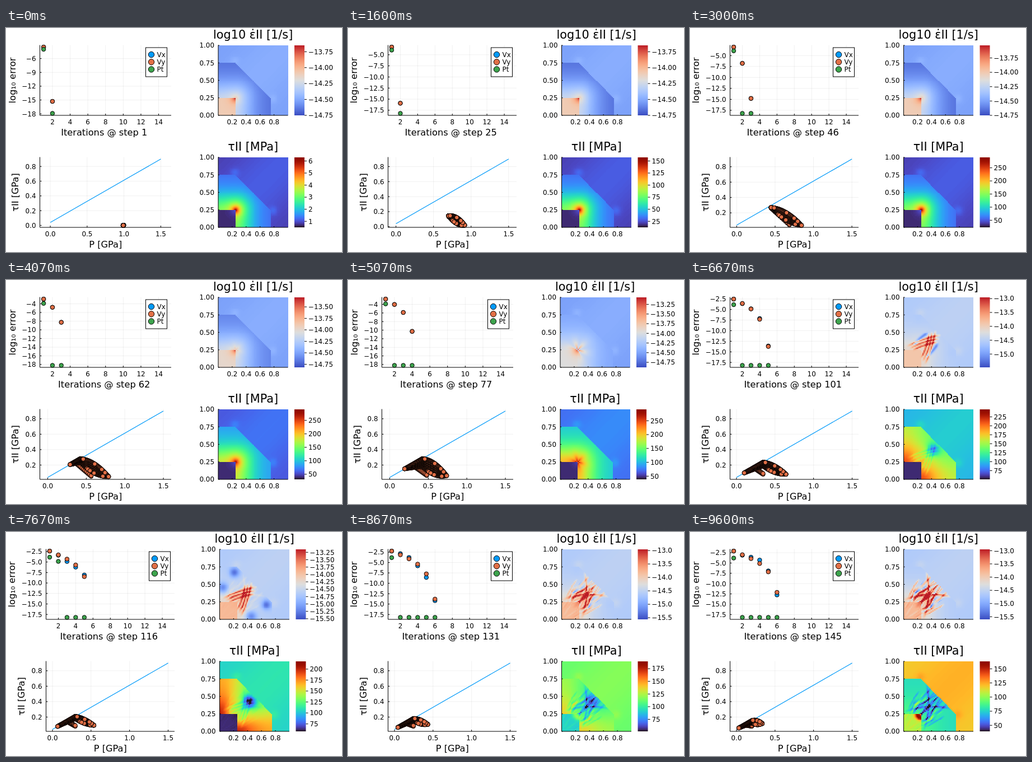
Write an HTML page with a canvas that moves like this. It is 600 px wide and 400 px high and loops after 9.67 s.

```html
<!DOCTYPE html>
<html lang="en">
<head>
<meta charset="utf-8">
<title>Shear band simulation</title>
<style>
html, body { margin: 0; width: 100%; height: 100%; overflow: hidden; background: #fff; }
svg, canvas { position: absolute; left: 0; top: 0; }
canvas { width: 124.5px; height: 125px; image-rendering: pixelated; }
text { font-family: "DejaVu Sans", sans-serif; font-size: 11.9px; fill: #000; }
.label { font-size: 16.2px; }
.title { font-size: 20.8px; }
.axis { stroke: #000; stroke-width: 1; fill: none; }
.grid { stroke: #000; stroke-opacity: .08; stroke-width: .8; }
</style>
</head>
<body>
<canvas id="strain" width="64" height="64"></canvas>
<canvas id="stress" width="64" height="64"></canvas>
<svg width="600" height="400" viewBox="0 0 600 400"><defs id="defs"></defs><g id="plot"></g></svg>
<script>
const LOOP = 9670, STEPS = 145, N = 64, TOP = 30.5, H = 125.5;
const BLUE = '#009af9', ORANGE = '#e26f46', GREEN = '#3da44d';
const $ = id => document.getElementById(id);
const mix = (a, b, f) => a + (b - a) * f;
const clamp = v => Math.max(0, Math.min(1, v));
const ramp = (s, a, b) => clamp((s - a) / (b - a));
const pulse = (s, mid, w) => Math.exp(-(((s - mid) / w) ** 2));

let seed = 11;
const rnd = () => (seed = seed * 16807 % 2147483647) / 2147483647;

// Colour maps
const GREY = [221, 221, 221];
const blend = (a, b, lift, u) => a.map((c, i) => mix(c, b[i], u) + lift[i] * Math.sin(Math.PI * u));
const warm = v => v < .5
  ? blend([59, 76, 192], GREY, [0, 28, 48], 2 * v)
  : blend(GREY, [188, 28, 38], [42, 36, -6], 2 * v - 1);
const CURVES = [
  [.1357, 4.6154, -42.6603, 132.1311, -152.9424, 59.2864],
  [.0914, 2.1942, 4.8430, -14.1850, 4.2773, 2.8296],
  [.1067, 12.6419, -60.5820, 110.3628, -89.9031, 27.3482]];
const turbo = v => CURVES.map(p => 255 * clamp(p.reduceRight((s, c) => s * v + c, 0)));
const shades = map => Array.from({ length: 256 }, (_, i) => map(i / 255).map(Math.round));

// Curved streak with soft ends
function streak(x, y, [x0, y0, x1, y1, bend, w]) {
  const dx = x1 - x0, dy = y1 - y0, len = Math.hypot(dx, dy);
  const u = ((x - x0) * dx + (y - y0) * dy) / (len * len);
  if (u < 0 || u > 1) return 0;
  const v = ((y - y0) * dx - (x - x0) * dy) / len - bend * 4 * u * (1 - u);
  return pulse(v, 0, w) * Math.min(1, 5 * u, 5 * (1 - u));
}

const arcs = [0, 1, 2].map(i => [.24 + .03 * i, .12 - .04 * i, .36 + .05 * i, .5 + .02 * i, -.02, .014]);
const sweep = [.28, 0, .32, .7, -.05, .015];
const rays = Array.from({ length: 18 }, () => {
  const x = rnd() * .38, y = .02 + rnd() * .3, t = .75 + rnd() * .4, l = .25 + rnd() * .25;
  return [x, y, x + l * Math.cos(t), y + l * Math.sin(t), .03 * (rnd() - .5), .008 + rnd() * .008];
});

// Everything about a cell that does not depend on time
const cells = Array.from({ length: N * N }, (_, i) => {
  const x = (i % N + .5) / N, y = 1 - (Math.floor(i / N) + .5) / N;
  const both = b => streak(x, y, b) + streak(y, x, b);
  const spot = (a, b, w) => pulse(x, a, w) * pulse(y, b, w) + pulse(x, b, w) * pulse(y, a, w);
  const turn = Math.atan2(y - .25, x - .25) - Math.PI / 4;
  return {
    core: x < .25 && y < .25,
    ring: x < .75 && y < .75 && x + y < 1,
    far: Math.hypot(Math.max(0, x - .25), Math.max(0, y - .25)),
    r: Math.hypot(x - .25, y - .25),
    star: Math.cos(6 * turn),
    cross: Math.cos(4 * (Math.atan2(y, x) - Math.PI / 4)),
    tilt: .02 * Math.cos(3 * (x - y)),
    halo: .04 * spot(.78, .24, .06),
    early: arcs.reduce((s, b) => s + both(b), 0),
    flank: both([.13, .29, .36, .5, .02, .022]),
    late: both(sweep) + rays.reduce((s, b, i) => s + both(b) * (i % 3 ? .7 : -.6), 0),
    cold: spot(.21, .67, .07) + spot(.04, .45, .08),
    pit: spot(.4, .46, .08),
    wedge: spot(.235, .2, .045)
  };
});

// Strength of the first and the late shear bands
const early = s => ramp(s, 80, 101) * (1 - .7 * ramp(s, 118, 135));
const late = s => ramp(s, 112, 140);
const jolt = s => pulse(s, 116, 8);

const strain = {
  id: 'strain', y: 31, map: shades(warm), steps: [.25, .5],
  range: s => [
    -14.75 - .13 * ramp(s, 46, 77) - .6 * ramp(s, 77, 101) - .12 * ramp(s, 101, 145),
    mix(-13.65, -12.95, ramp(s, 38, 85)) - .2 * jolt(s)],
  field(s) {
    const out = mix(.22, .38, ramp(s, 77, 101)), ring = mix(.07, .36, ramp(s, 55, 101));
    const near = mix(.35, .18, ramp(s, 55, 101)), tip = .45 * (1 - ramp(s, 80, 101));
    const core = .6 - .1 * pulse(s, 75, 18) + .08 * ramp(s, 85, 116), lobe = .3 * pulse(s, 82, 14);
    const e = .4 * early(s), l = .4 * late(s), flank = .3 * pulse(s, 101, 10), cold = .3 * jolt(s);
    return c => {
      const bands = e * c.early + l * c.late - flank * c.flank;
      if (c.core) return core + tip * Math.exp(-c.r / .05) + .3 * bands;
      if (!c.ring) return out + c.halo + c.tilt;
      return ring + near * Math.exp(-((c.far / .25) ** 1.5)) + .4 * tip * Math.exp(-c.r / .07)
        + lobe * c.star * Math.exp(-c.r / .06) + bands - cold * c.cold;
    };
  }
};

const stress = {
  id: 'stress', y: 231, map: shades(turbo), steps: [1, 2, 5, 10, 25, 50],
  range: s => [Math.min(.5 * s, 64 - .85 * (s - 116)), Math.min(6.3 * s, 291, 291 - 1.88 * (s - 77))],
  field(s) {
    const [lo, hi] = this.range(s);
    const out = (Math.min(s, 101) + .45 * Math.max(0, s - 101) - lo) / (hi - lo);
    const ring = .12 + .14 * ramp(s, 46, 77) + .27 * ramp(s, 77, 110) - .22 * ramp(s, 116, 145);
    const near = .34 + .05 * pulse(s, 77, 15) - .25 * ramp(s, 90, 140);
    const core = .03 + .51 * ramp(s, 116, 145), tip = .55 * (1 - ramp(s, 50, 101));
    const cross = .15 * ramp(s, 85, 116) * (1 - ramp(s, 120, 145)), lobe = .1 * pulse(s, 85, 14);
    const pit = .25 * pulse(s, 116, 20), wedge = .4 * ramp(s, 120, 145);
    const e = .1 * early(s), l = .2 * late(s);
    return c => {
      const bands = e * c.early + l * c.late;
      if (c.core) return core + .15 * tip * Math.exp(-c.r / .05) + wedge * c.wedge - .3 * bands;
      if (!c.ring) return out + c.halo + c.tilt;
      return ring + near * Math.exp(-((c.far / .25) ** 1.6)) + tip * Math.exp(-c.r / .06)
        + lobe * c.star * Math.exp(-c.r / .08) - cross * c.cross - pit * c.pit - bands;
    };
  }
};

for (const m of [strain, stress]) {
  m.ctx = $(m.id).getContext('2d');
  m.img = m.ctx.createImageData(N, N);
  const stops = Array.from({ length: 33 }, (_, i) =>
    `<stop offset="${i / 32}" stop-color="rgb(${m.map[Math.round(i / 32 * 255)]})"/>`).join('');
  $('defs').innerHTML += `<linearGradient id="g-${m.id}" x1="0" y1="1" x2="0" y2="0">${stops}</linearGradient>`;
}

// Newton convergence: slow start, then a geometric plunge after `delay` iterations
const first = s => -3.5 + .0097 * (s - 1);
const DELAY = [[1, -.91], [25, -.97], [46, .16], [77, 1.72], [101, 2.36], [116, 3.21], [145, 3.6]];
function delay(s) {
  const i = Math.min(DELAY.length - 1, DELAY.findIndex(p => p[0] > s) + DELAY.length) % DELAY.length || 0;
  const k = s >= STEPS ? DELAY.length - 1 : DELAY.findIndex(p => p[0] > s);
  const [a, b] = [DELAY[k - 1], DELAY[k]];
  return mix(a[1], b[1], ramp(s, a[0], b[0]));
}
const residual = (s, j) => first(s) - (j ? .85 * j + 3.5 ** (j - delay(s)) : 0);

// Grains of the stress cloud: flank along the yield line, tail, hook
const GRAINS = [];
const fill = (kind, cols, rows) => {
  for (let i = 0; i < cols; i++)
    for (let j = rows - 1; j >= 0; j--) GRAINS.push([kind, (i / (cols - 1)) ** 1.2, j / (rows - 1)]);
};
fill('hook', 12, 2);
fill('tail', 55, 6);
fill('flank', 42, 6);
for (let i = 0; i < 10; i++) GRAINS.push(['tail', rnd(), i % 2]);

const onYield = p => .04 + .573 * p;
function cloudPoints(s) {
  const pl = s < 48 ? 1 - .012 * s : .424 * Math.exp((48 - s) / 37);
  const left = [pl, Math.min(.006 * (s - 1), onYield(pl))];
  const pp = Math.max(pl, .424 - .0033 * Math.max(0, s - 77));
  const peak = [pp, Math.min(.006 * (s - 1), onYield(pp))];
  const end = [1 - .0034 * s - .0036 * Math.max(0, s - 97), .0008 * s];
  const hook = [mix(pp, end[0], .6 * (1 - ramp(s, 46, 90))), Math.min(.09, .0007 * s + .02 * ramp(s, 1, 20))];
  const bow = .05 * ramp(s, 1, 30) * (1 - .6 * ramp(s, 77, 116));
  const thick = .1 * ramp(s, 48, 77) * (1 - .7 * ramp(s, 77, 110));
  const at = (a, b, u, drop) => [mix(a[0], b[0], u), mix(a[1], b[1], u) - drop];
  return GRAINS.map(([kind, u, v]) =>
    kind === 'flank' ? at(peak, left, u, v * thick * (1 - u))
    : kind === 'tail' ? at(peak, end, u, v * thick * (1 - u) + (2 * v - 1) * bow * 4 * u * (1 - u))
    : at(at(left, peak, .6, .5 * thick), hook, u, .01 * v * ramp(s, 1, 20)));
}

// SVG helpers
const line = (x1, y1, x2, y2, cls = 'axis') => `<path class="${cls}" d="M${x1} ${y1}L${x2} ${y2}"/>`;
const text = (x, y, s, anchor = 'middle', cls = '') =>
  `<text class="${cls}" x="${x}" y="${y}" text-anchor="${anchor}">${s}</text>`;
const side = (x, y, s) =>
  `<text class="label" text-anchor="middle" transform="translate(${x} ${y}) rotate(-90)">${s}</text>`;
const dot = (x, y, fill, r = 3.7) =>
  `<circle cx="${x.toFixed(2)}" cy="${y.toFixed(2)}" r="${r}" fill="${fill}" stroke="#000"/>`;
const num = (v, d) => (Math.abs(v) < 1e-9 ? 0 : v).toFixed(d).replace('-', '−');

function ticks(lo, hi, step) {
  const out = [];
  for (let i = Math.ceil(lo / step - 1e-6); i * step <= hi + 1e-6; i++) out.push(i * step);
  return out;
}

function frame(left, right, top, xs, ys, px, py, dx, dy) {
  const bottom = top + H;
  let s = '';
  for (const v of xs) s += line(px(v), top, px(v), bottom, 'grid') + line(px(v), bottom, px(v), bottom - 3)
    + text(px(v), bottom + 15.5, num(v, dx));
  for (const v of ys) s += line(left, py(v), right, py(v), 'grid') + line(left, py(v), left + 3, py(v))
    + text(left - 7, py(v) + 4.4, num(v, dy), 'end');
  return s + `<path class="axis" d="M${left} ${top}V${bottom}H${right}"/>`;
}

function errors(step, left, right, grid) {
  const floor = mix(-17.9, -18.2, ramp(step, 1, 20)), hi = first(step), pad = .03 * (hi - floor);
  const px = v => left + (v - .58) / 14.84 * (right - left);
  const py = v => TOP + (hi + pad - v) / (hi - floor + 2 * pad) * H;
  let vx = '', vy = '', pt = '';
  for (let j = 0; j < 6; j++) {
    const x = px(j + 1), e = residual(step, j);
    const shift = .85 * ramp(step, 98, 112) * ramp(j, 0, 3) * Math.sin(1.1 * (j - 1.4) + .134 * (STEPS - step));
    const p = j === 0 ? -3.98 + .0012 * step : j === 1 && jolt(step) > .9 ? -4.85 : floor;
    vx += dot(x, py(e + shift), BLUE);
    vy += dot(x, py(e), ORANGE);
    pt += dot(x, py(p), GREEN);
    if (e < -8) break;
  }
  let s = frame(left, right, TOP, ticks(2, 14, 2), ticks(floor - pad, hi + pad, grid), px, py, 0, grid === 2.5 ? 1 : 0)
    + vx + vy + pt + `<rect x="${right - 45.5}" y="35" width="38" height="52" fill="#fff" stroke="#000"/>`;
  [['Vx', BLUE], ['Vy', ORANGE], ['Pt', GREEN]].forEach(([name, c], i) => {
    s += dot(right - 35.5, 47.5 + 13.2 * i, c, 5.2) + text(right - 25.5, 51.8 + 13.2 * i, name, 'start');
  });
  return s + side(grid === 2.5 ? 15.5 : 16.5, 93.5, 'log₁₀ error')
    + text((left + right) / 2 - 2.5, 192, 'Iterations @ step ' + step, 'middle', 'label');
}

function cloud(step, left, right) {
  const pts = cloudPoints(step);
  const low = Math.min(.04, ...pts.map(p => p[1]));
  const scale = H / ((.9 - low) * 1.06), pad = .03 * (.9 - low), mid = (left + right) / 2;
  const px = v => mid + (v - .75) * scale, py = v => TOP + 200 + (.9 + pad - v) * scale;
  return frame(left, right, TOP + 200, [0, .5, 1, 1.5], ticks(low - pad, .9, .2), px, py, 1, 1)
    + `<path d="M${px(0)} ${py(.04)}L${px(1.5)} ${py(.9)}" stroke="${BLUE}" stroke-width="1.2"/>`
    + pts.map(p => dot(px(p[0]), py(p[1]), ORANGE)).join('')
    + side(left - 38.5, 293.5, 'τII [GPa]') + text(mid, 392, 'P [GPa]', 'middle', 'label');
}

function heat(m, step, left, title) {
  const value = m.field(step), data = m.img.data;
  cells.forEach((c, i) => data.set([...m.map[Math.round(255 * clamp(value(c)))], 255], 4 * i));
  m.ctx.putImageData(m.img, 0, 0);
  $(m.id).style.left = left + 'px';
  $(m.id).style.top = m.y + 'px';

  const y = m.y, bottom = y + 125, bar = left + 136;
  let s = `<path class="axis" d="M${left} ${y - .5}V${bottom}H${left + 124.5}"/>`;
  for (const v of [.2, .4, .6, .8]) {
    const x = left + 124.5 * v;
    s += line(x, bottom, x, bottom - 2) + text(x, bottom + 15.5, v.toFixed(1));
  }
  for (const v of [0, .25, .5, .75, 1]) {
    const h = bottom - 125 * v;
    s += line(left, h, left + 2, h) + text(left - 7, h + 4.3, v.toFixed(2), 'end');
  }
  const [lo, hi] = m.range(step);
  const gap = m.steps.find(v => (hi - lo) / v < 9.6);
  const digits = gap === .25 ? 2 : gap === .5 ? 1 : 0;
  s += `<rect x="${bar}" y="${y}" width="18" height="125" fill="url(#g-${m.id})"/>`;
  for (const v of ticks(lo, hi, gap)) {
    const h = bottom - (v - lo) / (hi - lo) * 125;
    s += line(bar + 18, h, bar + 22, h) + text(bar + 25, h + 4.3, num(v, digits), 'start');
  }
  return s + text(left + 62.2, y - 12.5, title, 'middle', 'title');
}

function draw(step) {
  const top = first(step);
  const grid = top < -3.4 ? 3 : top > -3 && top < -2.58 ? 2 : 2.5;
  const wide = grid === 2.5;
  const left = wide ? 71.5 : 60.5, right = wide ? 301 : 295, map = wide ? 381.5 : 379;
  $('plot').innerHTML = errors(step, left, right, grid) + cloud(step, left, right)
    + heat(strain, step, map, 'log10 ε̇II [1/s]') + heat(stress, step, map, 'τII [MPa]');
}

let shown = 0;
function tick() {
  const t = performance.now() % LOOP, r = t % 200;
  const step = Math.min(STEPS, 3 * Math.floor(t / 200) + (r < 70 ? 1 : r < 130 ? 2 : 3));
  if (step !== shown) draw(shown = step);
  requestAnimationFrame(tick);
}
tick();
</script>
</body>
</html>
```
